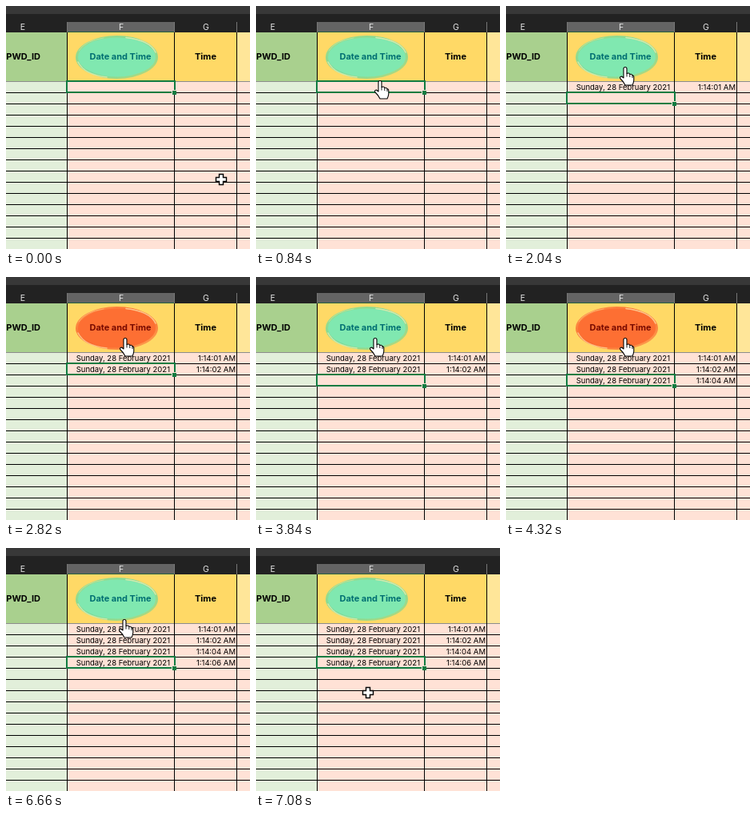
These frames come from a looping animation (305x304 px, 7.14 s). An HTML page:

```html
<!DOCTYPE html>
<html lang="en">
<head>
<meta charset="utf-8">
<title>Timestamp sheet</title>
<style>
  html, body { margin: 0; width: 100%; height: 100%; overflow: hidden; background: #222; }
  svg { display: block; width: 100vw; height: 100vh; }
  text { font-family: Inter, Roboto, sans-serif; font-size: 9.5px; fill: #000; }
  .col { font-size: 10.5px; fill: #e4e4e4; text-anchor: middle; }
  .head { font-size: 11px; font-weight: 700; text-anchor: middle; }
  .cell { text-anchor: end; }
</style>
</head>
<body>
<svg viewBox="0 0 305 304">
  <defs>
    <linearGradient id="greenRim" x2="1" y2="1">
      <stop offset="0" stop-color="#a9dc85"/><stop offset=".5" stop-color="#76d99c"/><stop offset="1" stop-color="#bcd978"/>
    </linearGradient>
    <linearGradient id="redRim" x2="1" y2="1">
      <stop offset="0" stop-color="#ffa050"/><stop offset=".5" stop-color="#f9622b"/><stop offset="1" stop-color="#ffad58"/>
    </linearGradient>
  </defs>
  <g id="sheet" shape-rendering="crispEdges"></g>

  <g id="button">
    <ellipse id="rim" cx="138.5" cy="64" rx="51.5" ry="27"/>
    <ellipse id="face" cx="138.5" cy="64" rx="48.5" ry="24.5"/>
    <g fill="none" stroke="#fff3b8" stroke-linecap="round">
      <path d="M150 39.5Q180 43 187 58" stroke-width="1.6" opacity=".65"/>
      <path d="M90 70Q98 86 126 89" stroke-width="1.6" opacity=".6"/>
      <path d="M91 56Q99 43 122 40" stroke-width="1" opacity=".35"/>
    </g>
  </g>

  <text class="col" x="21" y="30">E</text>
  <text class="col" x="144" y="30">F</text>
  <text class="col" x="250" y="30">G</text>
  <text class="head" x="43" y="67" style="text-anchor:end">PWD_ID</text>
  <text class="head" x="143" y="67" id="label">Date and Time</text>
  <text class="head" x="249.5" y="67">Time</text>
  <g id="entries"></g>

  <g id="selection" shape-rendering="crispEdges">
    <path d="M76 94H211V105M207 108H76V93" fill="none" stroke="#107c41" stroke-width="2"/>
    <path d="M207 105h6v6h-6z" fill="#fde3d8"/>
    <path d="M208 106h5v5h-5z" fill="#107c41"/>
  </g>

  <path id="cross" fill="#fff" stroke="#000" stroke-width="1.4"
    d="M-2.5 -6.5h5v4h4v5h-4v4h-5v-4h-4v-5h4z"/>
  <g id="hand" fill="#fff" stroke="#000" stroke-width="1.1" stroke-linejoin="round">
    <path d="M-2 2.5Q-2 .5 0 .5T2 2.5V8.5Q5 7 5.8 9.5Q8.3 8.5 9 11Q10.8 10.5 10.8 13V17Q10.5 20 9 23H0Q-2 18.5 -6 15Q-7.5 12.5 -4.5 12L-2 14Z"/>
    <path d="M2 8.5V12.5M5.8 9.5V13M9 11V14" fill="none" stroke-width=".9"/>
  </g>
</svg>
<script>
const LOOP = 7140, STEP = 60, ROW = 14, TOP = 94;
const $ = id => document.getElementById(id);

function add(parent, tag, attrs, text = "") {
  const el = document.createElementNS("http://www.w3.org/2000/svg", tag);
  for (const k in attrs) el.setAttribute(k, attrs[k]);
  el.textContent = text;
  return parent.appendChild(el);
}
const rect = (x, y, width, height, fill) => add($("sheet"), "rect", { x, y, width, height, fill });

// Sheet background
rect(0, 0, 305, 10, "#383838");
rect(0, 10, 305, 23, "#222");
rect(77, 20, 133, 12, "#646464");
rect(77, 32, 133, 1, "#27613f");
const columns = [
  [0, 76, "#a9d08e", "#e2efda"],
  [76, 134, "#ffd966", "#ffe2d6"],
  [210, 78, "#ffd966", "#ffe2d6"],
  [288, 17, "#ffe699", "#ffe2d6"]
];
for (const [x, w, head, body] of columns) {
  rect(x, 33, w, 61, head);
  rect(x, TOP, w, 210, body);
}
for (let y = TOP + ROW; y < 304; y += ROW) rect(0, y, 305, 1, "#000");
rect(0, TOP, 305, 1, "#8c8c8c");
for (const x of [76, 210, 288]) {
  rect(x, 20, 1, 13, "#777");
  rect(x, 33, 1, 271, "#000");
}

// Each entry: clock text, time the date appears, time the clock appears
const entries = [
  ["1:14:01 AM", 1320, 1320],
  ["1:14:02 AM", 2820, 2820],
  ["1:14:04 AM", 4260, 4320],
  ["1:14:06 AM", 5760, 5760]
];
const cells = entries.flatMap(([clock, dateAt, clockAt], i) => {
  const y = TOP + 11 + i * ROW;
  const cell = (x, text, at) => ({ at, el: add($("entries"), "text", { class: "cell", x, y }, text) });
  return [cell(205, "Sunday, 28 February 2021", dateAt), cell(287, clock, clockAt)];
});

const presses = [[1320, 2040], [2820, 2940], [4200, 5040], [5760, 6600]];
const rowMoves = [1860, 3840, 5100];
// Cursor stops: time, x, y
const path = [[120, 269, 217], [840, 155, 93], [1080, 149, 76], [6540, 149, 76], [7080, 140, 181]];

function cursorAt(t) {
  if (t <= path[0][0]) return path[0].slice(1);
  for (let i = 1; i < path.length; i++) {
    const [t0, x0, y0] = path[i - 1], [t1, x1, y1] = path[i];
    if (t <= t1) {
      const p = (t - t0) / (t1 - t0), e = p * p * (3 - 2 * p);
      return [x0 + (x1 - x0) * e, y0 + (y1 - y0) * e].map(Math.round);
    }
  }
  return path[path.length - 1].slice(1);
}

const show = (el, on) => el.setAttribute("visibility", on ? "visible" : "hidden");
const move = (el, x, y) => el.setAttribute("transform", `translate(${x} ${y})`);

function draw(now) {
  const t = Math.floor(now % LOOP / STEP) * STEP;
  const red = presses.some(([a, b]) => t >= a && t < b);
  $("rim").setAttribute("fill", red ? "url(#redRim)" : "url(#greenRim)");
  $("face").setAttribute("fill", red ? "#fd6f33" : "#80e8b0");
  $("label").style.fill = red ? "#780a00" : "#006f72";

  for (const { at, el } of cells) show(el, t >= at);
  move($("selection"), 0, ROW * rowMoves.filter(at => t >= at).length);

  const [x, y] = cursorAt(t), pointing = y < 95;
  show($("hand"), pointing);
  show($("cross"), !pointing);
  move($("hand"), x, y);
  move($("cross"), x, y);
}

const start = performance.now();
function tick() {
  draw(performance.now() - start);
  requestAnimationFrame(tick);
}
tick();
</script>
</body>
</html>
```
